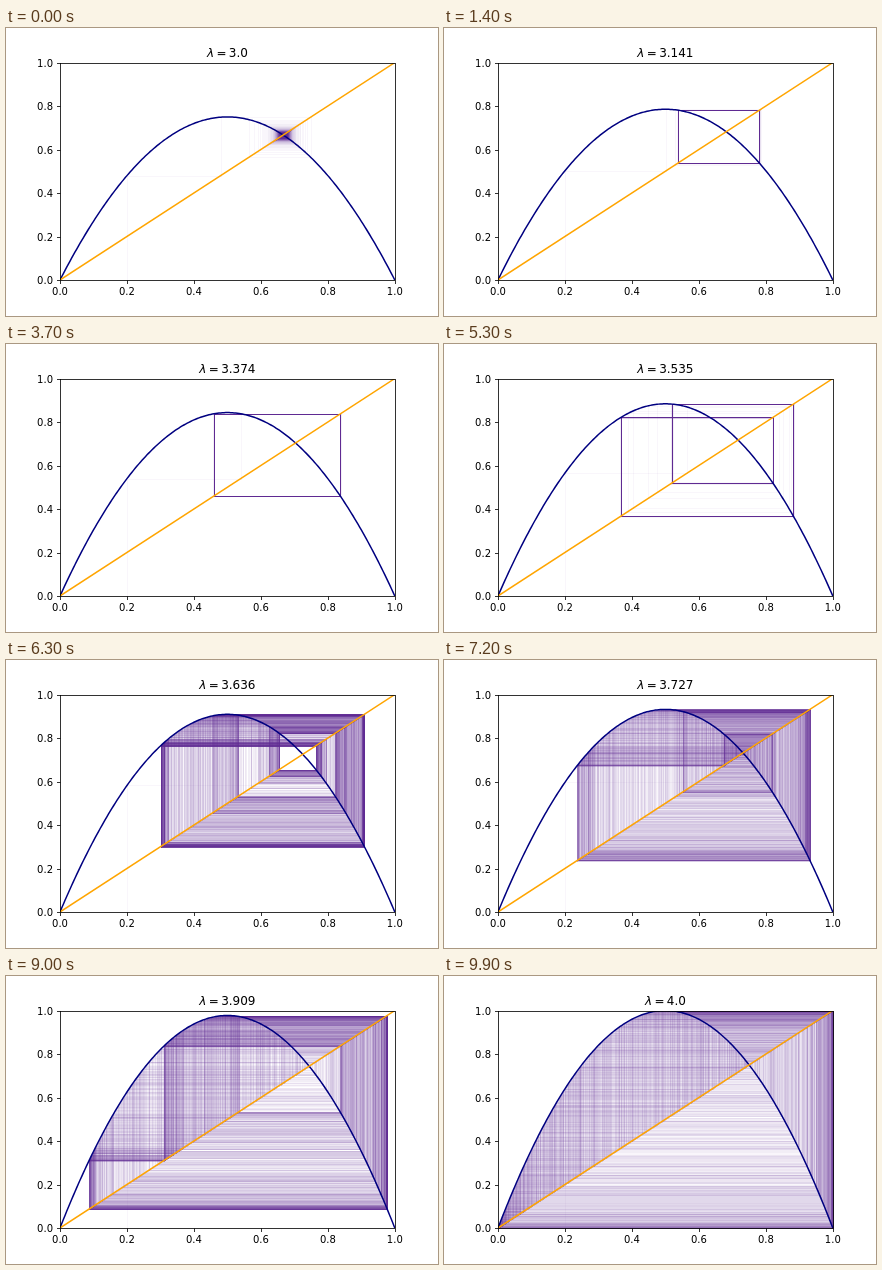
Write an HTML page with a canvas that moves like this. It is 432 by 288 pixels and loops after 10000 ms.

```html
<!DOCTYPE html>
<html lang="en">
<head>
<meta charset="utf-8">
<title>Logistic map cobweb</title>
<style>
  html, body { margin: 0; width: 100%; height: 100%; overflow: hidden; background: #fff; }
  canvas { display: block; width: 432px; height: 288px; }
</style>
</head>
<body>
<canvas id="plot" width="432" height="288"></canvas>
<script>
const W = 432, H = 288;
const LEFT = 54, RIGHT = 388.8, TOP = 34.56, BOTTOM = 252;
const STEPS = 100, STEP_MS = 100;
const ORBIT = 2500, START = 0.2, ALPHA = 0.04;
const WEB = [95, 42, 146];
const FONT = '"DejaVu Sans", Verdana, sans-serif';

const ctx = document.getElementById('plot').getContext('2d');
const px = x => LEFT + x * (RIGHT - LEFT);
const py = y => BOTTOM - y * (BOTTOM - TOP);
const hits = new Uint16Array(W * H);

// Count how often each pixel is crossed, then turn the count into opacity.
function drawWeb(rate) {
  hits.fill(0);
  let x = START, from = 0;
  for (let i = 0; i < ORBIT; i++) {
    const y = rate * x * (1 - x);
    const col = Math.round(px(x)), next = Math.round(px(y));
    const row = Math.round(py(y)), prev = Math.round(py(from));
    for (let r = Math.min(row, prev); r <= Math.max(row, prev); r++) hits[r * W + col]++;
    for (let c = Math.min(col, next); c <= Math.max(col, next); c++) hits[row * W + c]++;
    x = from = y;
  }
  const image = ctx.createImageData(W, H);
  for (let i = 0; i < hits.length; i++) {
    const cover = 1 - Math.pow(1 - ALPHA, hits[i]);
    for (let k = 0; k < 3; k++) image.data[i * 4 + k] = 255 + (WEB[k] - 255) * cover;
    image.data[i * 4 + 3] = 255;
  }
  ctx.putImageData(image, 0, 0);
}

function drawCurve(fn, color, count) {
  ctx.beginPath();
  for (let i = 0; i <= count; i++) ctx.lineTo(px(i / count), py(fn(i / count)));
  ctx.strokeStyle = color;
  ctx.lineWidth = 1.5;
  ctx.lineJoin = 'round';
  ctx.stroke();
}

function drawAxes() {
  const l = Math.round(LEFT) + 0.5, r = Math.round(RIGHT) + 0.5;
  const t = Math.round(TOP) + 0.5, b = Math.round(BOTTOM) + 0.5;
  ctx.strokeStyle = ctx.fillStyle = '#000';
  ctx.lineWidth = 0.8;
  ctx.strokeRect(l, t, r - l, b - t);
  ctx.font = '10px ' + FONT;
  ctx.beginPath();
  for (let i = 0; i <= 5; i++) {
    const v = i / 5, x = Math.round(px(v)), y = Math.round(py(v));
    ctx.moveTo(x + 0.5, b);
    ctx.lineTo(x + 0.5, b + 3.5);
    ctx.moveTo(l, y + 0.5);
    ctx.lineTo(l - 3.5, y + 0.5);
    ctx.textAlign = 'center';
    ctx.fillText(v.toFixed(1), px(v), 267);
    ctx.textAlign = 'right';
    ctx.fillText(v.toFixed(1), 47, y + 4);
  }
  ctx.stroke();
}

function drawTitle(rate) {
  const value = +rate.toFixed(3);
  const label = Number.isInteger(value) ? value.toFixed(1) : String(value);
  const upright = '12px ' + FONT;
  const parts = [['λ', 'italic ' + upright], ['=', upright], [label, upright]];
  const gap = 2.34;
  const widths = parts.map(([text, font]) => {
    ctx.font = font;
    return ctx.measureText(text).width;
  });
  let x = (LEFT + RIGHT - widths.reduce((a, b) => a + b) - 2 * gap) / 2;
  ctx.textAlign = 'left';
  parts.forEach(([text, font], i) => {
    ctx.font = font;
    ctx.fillText(text, x, 29);
    x += widths[i] + gap;
  });
}

function draw(step) {
  const rate = 3 + step / (STEPS - 1);
  drawWeb(rate);
  ctx.save();
  ctx.beginPath();
  ctx.rect(54, 35, 335, 217);
  ctx.clip();
  drawCurve(x => rate * x * (1 - x), '#000080', 200);
  drawCurve(x => x, '#ffa500', 1);
  ctx.restore();
  drawAxes();
  drawTitle(rate);
}

let shown = -1;
function tick() {
  const step = Math.floor(performance.now() / STEP_MS) % STEPS;
  if (step !== shown) draw(shown = step);
  requestAnimationFrame(tick);
}
tick();
</script>
</body>
</html>
```
